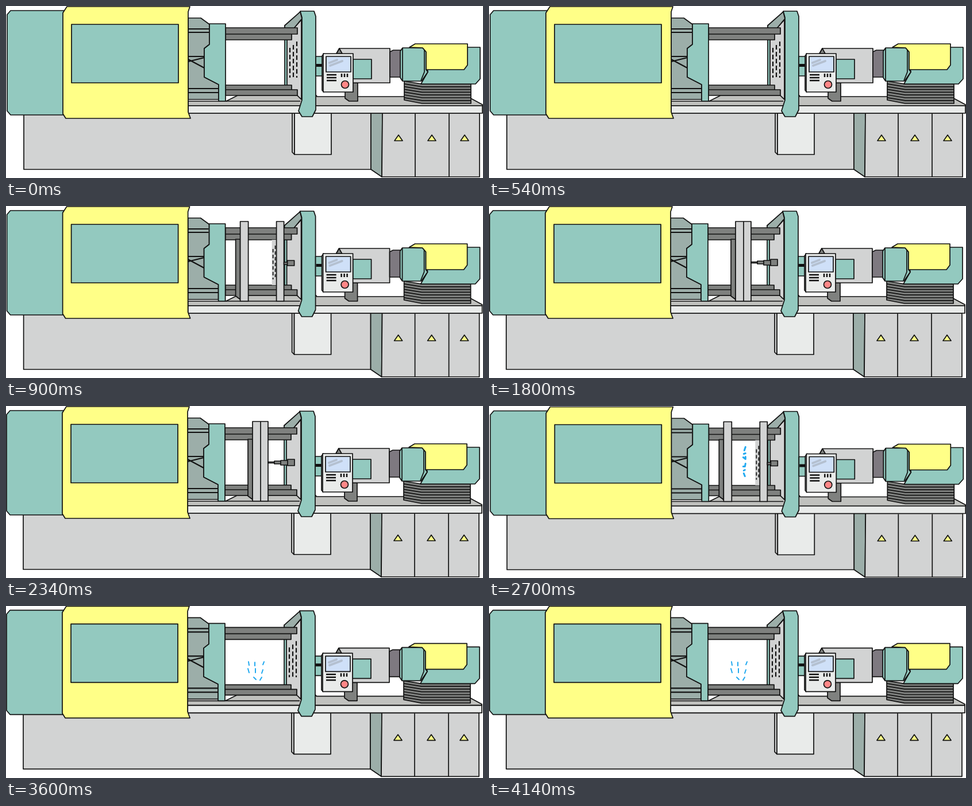
Animation, 830 px wide and 300 px high, one loop 4.5 s. Source, as an HTML page:

```html
<!DOCTYPE html>
<html lang="en">
<head>
<meta charset="utf-8">
<title>Moulding machine</title>
<style>
html, body { margin: 0; width: 100%; height: 100%; overflow: hidden; background: #fff; }
svg { display: block; width: 830px; height: 300px; }
path, circle { stroke: #111; stroke-width: 1.7; stroke-linejoin: round; fill: none; }
.teal { fill: #93c9bf; }
.yellow { fill: #ffff87; }
.grey { fill: #d2d3d3; }
.light { fill: #e9ebea; }
.shade { fill: #9caea9; }
.top { fill: #c0c1be; }
.bar { fill: #7f817f; }
.dark { fill: #7e7980; }
.bold, .slots { stroke-width: 2.2; }
.water { stroke: #22aaf0; stroke-width: 2; stroke-linecap: round; }
</style>
</head>
<body>
<svg viewBox="0 0 830 300">
<g id="machine">
  <!-- base and cabinets -->
  <path class="grey" d="M31 187H635V285H31Z"/>
  <path class="shade" d="M635 187H655L654 298L635 285Z"/>
  <path class="grey" d="M655 187H824V298H654Z"/>
  <path d="M712 188V298M771 188V298"/>
  <path class="yellow" d="M683 225l7 10h-14ZM741 225l7 10h-14ZM798 225l7 10h-14Z"/>
  <path class="grey" d="M498 187H502V259L498 255Z"/>
  <path class="light" d="M502 187H566V259H502Z"/>

  <!-- table -->
  <path class="top" d="M317 166H383L403 156H540L541 158H803L829 172V174H317Z"/>
  <path class="light" d="M317 174H829V187H317Z"/>
  <path d="M383 166H512"/>

  <!-- fixed platen, inner side -->
  <path class="teal" d="M485 34H490V141L485 138Z"/>
  <path class="grey" d="M489 52L514 24V163L489 139Z"/>
  <path class="shade" d="M485 34L512 10L515 22L489 53L485 50Z"/>
  <path class="slots" data-show="open" d="M494 73V125M500 68V125M506 62V125" stroke-dasharray="8 4"/>

  <!-- tie bars -->
  <path class="bar" d="M382 49H497V59H382ZM382 38H507V49H382ZM382 138H497V146H382ZM382 146H507V156H382Z"/>

  <!-- mould halves apart -->
  <g data-show="apart">
    <path class="bar" d="M400 58H408V163L400 157Z"/>
    <path class="grey" d="M408 27H422V166H408Z"/>
    <path class="grey" d="M463 59H471V138H463Z" style="stroke:none"/>
    <path class="slots" d="M465 75V128M469 69V124" stroke-dasharray="6 4" style="stroke-width:1.700"/>
    <path class="grey" d="M471 27H484V166H471Z"/>
    <path class="bar" d="M484 98H490V102H484ZM490 95H502V104H490Z"/>
  </g>

  <!-- mould closed, nozzle in contact -->
  <g data-show="closed">
    <path class="bar" d="M422 58H430V163L422 157Z"/>
    <path class="grey" d="M430 27H457V166H430ZM444 27V166"/>
    <path class="bar" d="M457 97.500H468V99.500H457ZM468 96H479V101H468ZM479 95H491V103H479ZM491 93H503V104H491Z"/>
  </g>

  <path class="water" data-show="mist" style="stroke-width:3" d="M446 71l-2 6M443 83l3-1M442 89l4 3M446 88v3M446 100l-1 5M442 105l2 0M445 111l-2 1M443 117l2 5"/>
  <path class="water" data-show="drops" d="M423 98l1 6M434 99v6M450 98l-2 5M422 110l2 7M435 110v7M448 112l-2 6M432 125l4 4M446 125l-3 5"/>

  <!-- clamp -->
  <path class="shade" d="M317 21H339L354 32V67L345 74V124L370 137V163H317Z"/>
  <path class="bold" d="M317 40H353M317 46H353M317 88H345M317 97L345 90M317 93L345 108M317 144H370M317 151H370"/>
  <path class="teal" d="M354 31H382V166H370V137L345 124V74L354 67Z"/>

  <!-- cover and door -->
  <path class="teal" d="M8 8H102V190H8L2 183V15Z"/>
  <path class="yellow" d="M106 1H320L317 10V185L321 196H104L99 188V12Z"/>
  <path class="teal" d="M114 32H300V134H114Z"/>

  <!-- fixed platen, front -->
  <path class="teal" d="M512 9H536L539 18V181L533 193H515L509 183L515 164V20Z"/>

  <!-- injection unit -->
  <path class="teal" d="M539 88H552V122H539Z"/>
  <path d="M540 103.500H550" style="stroke-width:5"/>
  <path class="bar" d="M590 148L597 134H612V166H597L590 161Z"/>
  <path class="grey" d="M575 83L580 74H668V134H590Z"/>
  <path class="bar" d="M575 83L580 74L585 83Z"/>
  <path class="teal" d="M604 93H636V127H604Z"/>
  <path class="dark" d="M668 80L674 77H690V124H668Z"/>
  <path class="grey" d="M550 87L553 83V150L550 147Z"/>
  <path class="light" d="M552 83H604V150H552Z"/>
  <path d="M557 88H600V115H557Z" style="fill:#cfe0f8"/>
  <path d="M563 99L576 94M564 104L585 96" style="stroke:#b4c0d0;stroke-width:4;stroke-linecap:round"/>
  <path d="M558 120H575M558 125H575M558 130H575M584 118V124M589 118V124M594 118V124" style="stroke-width:2.500"/>
  <circle cx="590" cy="137" r="6.500" style="fill:#ff8787"/>

  <!-- motor and bellows -->
  <path class="bar" d="M693 131L724 136H809V170H724L693 164Z"/>
  <path id="folds"/>
  <path class="teal" d="M728 72H825V127L817 136H722L734 115Z"/>
  <path class="teal" d="M686 79L690 73H725L731 80V111L734 115L723 131H690L686 125Z"/>
  <path d="M690 73V130M728 77V115L722 130"/>
  <path class="yellow" d="M702 72L712 66H803V103L797 111H731V80L725 73Z"/>
</g>
</svg>
<script>
const stepTime = 900;
const phases = [
  { show: ['open'], x: 0, y: 0 },
  { show: ['apart'], x: -0.4, y: 0 },
  { show: ['closed'], x: -1, y: 0 },
  { show: ['apart', 'mist'], x: 0.3, y: 0.5 },
  { show: ['open', 'drops'], x: -1, y: -0.7 }
];
const machine = document.getElementById('machine');
const parts = document.querySelectorAll('[data-show]');

let folds = '';
for (let i = 1; i < 7; i++) {
  const drop = i * 4.8;
  folds += `M693 ${131 + drop}L724 ${136 + drop}H809`;
}
document.getElementById('folds').setAttribute('d', folds);

function draw(now) {
  const phase = phases[Math.floor(now / stepTime) % phases.length];
  for (const part of parts) {
    part.style.display = phase.show.includes(part.dataset.show) ? '' : 'none';
  }
  machine.setAttribute('transform', `translate(${phase.x} ${phase.y})`);
}

const start = performance.now();
function tick() {
  draw(performance.now() - start);
  requestAnimationFrame(tick);
}
tick();
</script>
</body>
</html>
```
